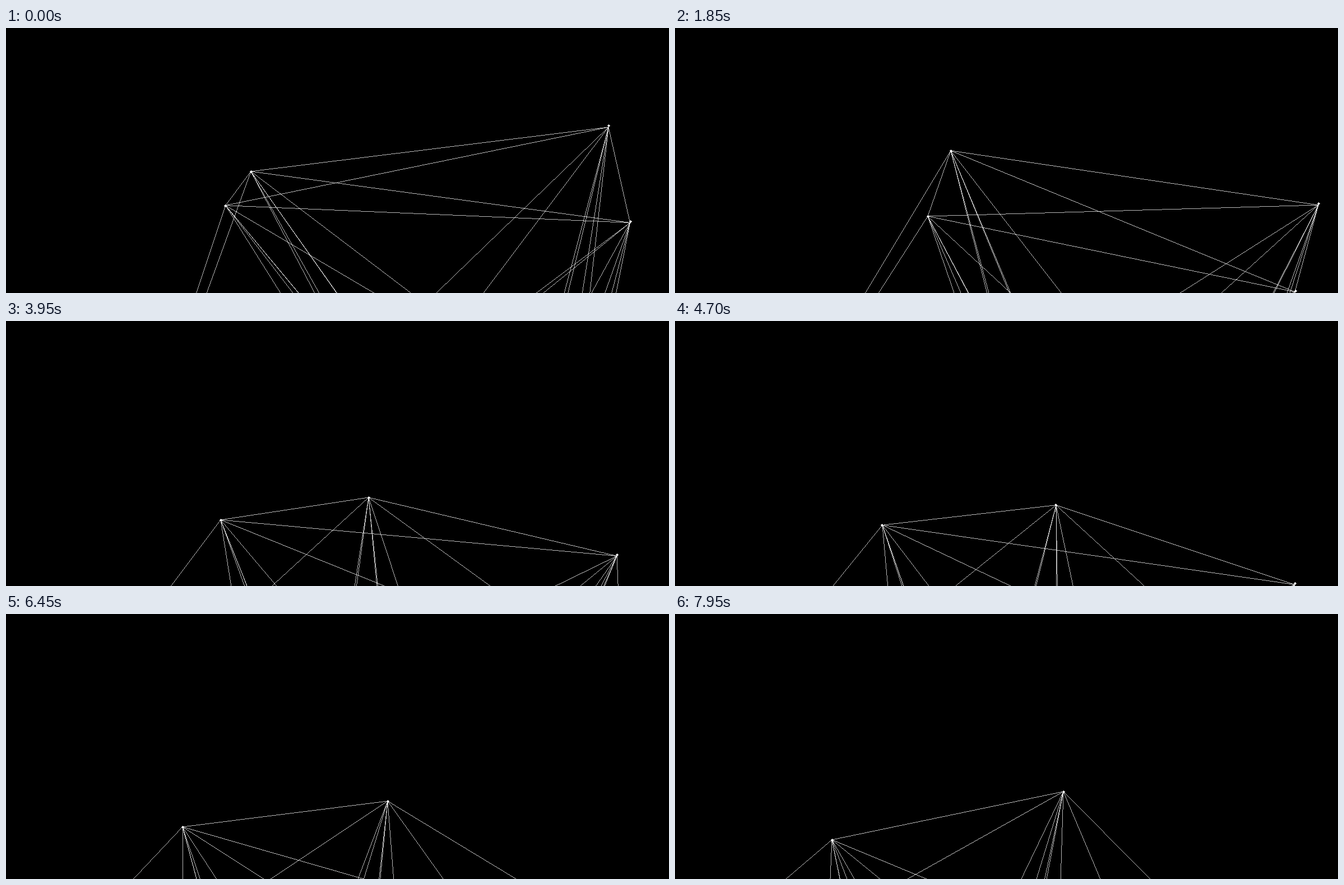
An HTML page with a canvas for the animation above (8000 ms loop, 1183 by 473 pixels).

```html
<!DOCTYPE html>
<html lang="en">
<head>
<meta charset="utf-8">
<title>Drifting network</title>
<style>
  html, body { margin: 0; width: 100%; height: 100%; overflow: hidden; background: #000; }
  canvas { display: block; }
</style>
</head>
<body>
<canvas id="stage" width="1183" height="473"></canvas>
<script>
const W = 1183, H = 473, LOOP = 8000, STEP = 50, LINE_ALPHA = 0.72;
const CENTER = [592, 700];
const ctx = document.getElementById('stage').getContext('2d');
const image = ctx.createImageData(W, H);
const pixels = new Uint32Array(image.data.buffer);
const light = new Uint8ClampedArray(W * H);

// Nodes drift through a few key points; those below the stage need fewer.
const NEAR_TIMES = [0, 1850, 2950, 3950, 5500, 6450, 7950];
const FAR_TIMES = [0, 1850, 5500, 7950];

const near = (dot, ...keys) => ({ dot, keys, times: NEAR_TIMES });
const far = (...keys) => ({ keys, times: FAR_TIMES });

const nodes = [
  near([0, 0.5], [391.7, 316.7], [451, 336], [402, 368], [383, 355], [353, 377], [315, 380], [280, 403]),
  near([0, 0], [437, 256], [492, 219], [576, 229], [647, 315], [701, 330], [681, 334], [693, 317]),
  near([0.5, -2.2], [1075, 177], [1148, 316], [1127.5, 391.5], [1090, 419.5], [1133, 535], [1156, 622], [1127, 754]),
  near([1, -2], [1113.5, 347.5], [1106, 471], [1138, 565], [1099, 644], [1087, 775], [1051, 852], [965, 961]),
  far([137, 1081], [-7, 1051], [-156, 952], [-218, 828]),
  far([950, 646], [920, 770], [774, 980], [669, 1083]),
  far([684, 696], [641, 776], [512, 903], [495, 960]),
  far([859, 1061], [726, 1135], [381, 1282], [243, 1252]),
  far([948, 982], [862, 1117], [633, 1304], [472, 1350]),
  far([980, 1023], [880, 1141], [644, 1342], [485, 1400])
];

// Cubic Hermite curve through unevenly spaced keys.
function position({ times, keys }, t) {
  const last = times.length - 1;
  let i = 0;
  while (i < last - 1 && t > times[i + 1]) i++;
  const span = times[i + 1] - times[i];
  const u = Math.min((t - times[i]) / span, 1), v = 1 - u;
  const slope = (n, axis) => {
    const a = Math.max(n - 1, 0), b = Math.min(n + 1, last);
    return (keys[b][axis] - keys[a][axis]) / (times[b] - times[a]);
  };
  return [0, 1].map(k =>
    v * v * (1 + 2 * u) * keys[i][k] + u * u * (3 - 2 * u) * keys[i + 1][k] +
    span * u * v * (v * slope(i, k) - u * slope(i + 1, k)));
}

// Half a sine wave between two times, zero elsewhere.
function pulse(t, from, to) {
  return t > from && t < to ? Math.sin(Math.PI * (t - from) / (to - from)) : 0;
}

// The view swells early in the loop and sways left near its end.
function view(p, t) {
  const zoom = 1 + 0.052 * pulse(t, 0, 1850);
  const sway = -22 * pulse(t, 6450, 7950);
  return [CENTER[0] + (p[0] - CENTER[0]) * zoom + sway, CENTER[1] + (p[1] - CENTER[1]) * zoom];
}

function plot(x, y, alpha) {
  if (x < 0 || x >= W || y < 0 || y >= H) return;
  const i = y * W + x;
  light[i] += (255 - light[i]) * alpha;
}

// Hard-edged line one pixel wide, stepped along its longer axis.
function line(p, q) {
  const steep = Math.abs(q[1] - p[1]) > Math.abs(q[0] - p[0]);
  const m = steep ? 1 : 0, n = 1 - m;
  if (p[m] > q[m]) [p, q] = [q, p];
  const k = (q[n] - p[n]) / (q[m] - p[m] || 1);
  const start = Math.max(0, Math.floor(p[m]));
  const end = Math.min((steep ? H : W) - 1, Math.floor(q[m]));
  for (let s = start; s <= end; s++) {
    const o = Math.floor(p[n] + k * (s + 0.5 - p[m]));
    if (steep) plot(o, s, LINE_ALPHA); else plot(s, o, LINE_ALPHA);
  }
}

function diamond(x, y) {
  x = Math.floor(x);
  y = Math.floor(y);
  for (let dy = -2; dy <= 2; dy++) {
    const r = 2 - Math.abs(dy);
    for (let dx = -r; dx <= r; dx++) plot(x + dx, y + dy, 1);
  }
}

function draw(t) {
  light.fill(0);
  const points = nodes.map(n => view(position(n, t), t));
  points.forEach((p, i) => {
    for (const q of points.slice(i + 1)) {
      if (p[1] < H || q[1] < H) line(p, q);
    }
    const { dot } = nodes[i];
    if (dot) diamond(p[0] + dot[0], p[1] + dot[1]);
  });
  for (let i = 0; i < light.length; i++) pixels[i] = 0xff000000 | light[i] * 0x010101;
  ctx.putImageData(image, 0, 0);
}

const begin = performance.now();
function tick() {
  const t = (performance.now() - begin) % LOOP;
  draw(Math.floor(t / STEP) * STEP);
  requestAnimationFrame(tick);
}
tick();
</script>
</body>
</html>
```
